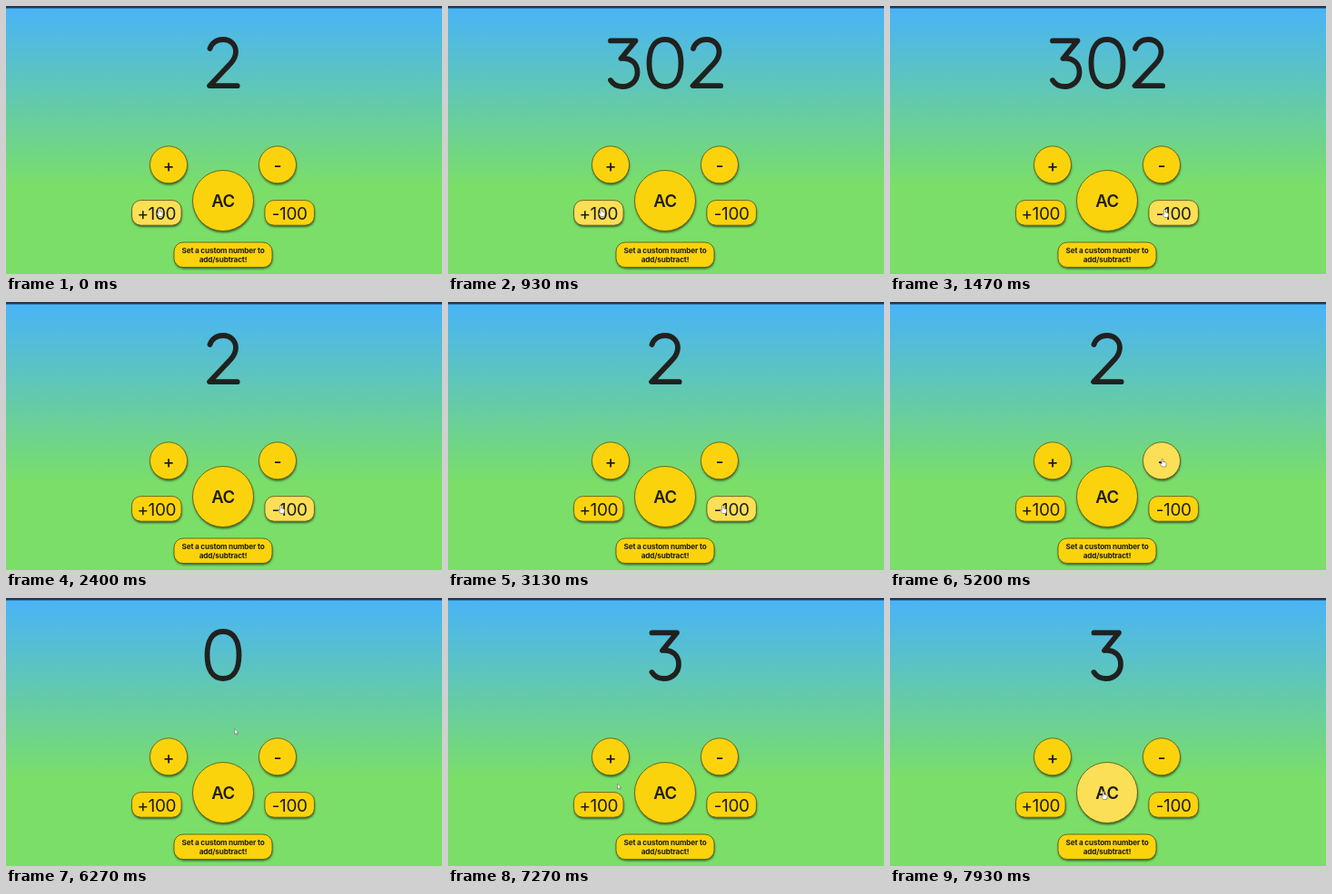
An HTML page that plays this animation: 480 px wide and 296 px high, repeating every 8 s.

```html
<!DOCTYPE html>
<html lang="en">
<head>
<meta charset="utf-8">
<title>Counter</title>
<style>
  html, body { margin: 0; width: 100%; height: 100%; overflow: hidden; background: #7ade69; }
  svg { display: block; width: 100vw; height: 100vh; }
  text { font-family: Inter, Lato, sans-serif; fill: #1d1d14; text-anchor: middle; }
  .key { stroke: #665f1c; stroke-width: .9; }
  .shade { fill: #1f3a19; opacity: .8; }
  #number { fill: none; stroke: #20211f; stroke-width: 5.8; stroke-linecap: round; stroke-linejoin: round; }
  #cursor path { fill: #fff; stroke: #66675d; stroke-width: .6; stroke-linejoin: round; }
</style>
</head>
<body>
<svg viewBox="0 0 480 296" preserveAspectRatio="none">
  <defs>
    <linearGradient id="sky" x1="0" y1="0" x2="0" y2="1">
      <stop offset="0" stop-color="#48b3f9"/>
      <stop offset=".67" stop-color="#7ade69"/>
    </linearGradient>
    <filter id="soft" x="-20%" y="-20%" width="140%" height="150%"><feGaussianBlur stdDeviation=".8"/></filter>
  </defs>
  <rect width="480" height="296" fill="url(#sky)"/>
  <rect width="480" height="2.5" fill="#27354e"/>
  <rect x="46" width="380" height="1.6" fill="#343149"/>
  <g id="number" role="img"></g>
  <g id="keys"></g>
  <g id="cursor">
    <path id="arrow" d="M0 0V6L1.5 4.8 2.5 6.9 3.4 6.4 2.5 4.4H4.3Z"/>
    <path id="hand" d="M-.9 .7Q0-.6.8.7V3.4L3.4 4.1Q4.5 4.5 4.2 6L3.6 9H-.4L-2.6 6Q-2.8 5-1.8 5.2L-.9 6Z"/>
  </g>
</svg>
<script>
const LOOP = 8000;
const MID = 239;
const $ = id => document.getElementById(id);

function add(parent, tag, attrs, content) {
  const el = document.createElementNS("http://www.w3.org/2000/svg", tag);
  for (const k in attrs) el.setAttribute(k, attrs[k]);
  if (content) el.textContent = content;
  parent.append(el);
  return el;
}

function makeKey(x, y, w, h, size, weight, ...lines) {
  const r = Math.min(h / 2, w > h ? 10 : w);
  const box = { x: x - w / 2, y: y - h / 2, width: w, height: h, rx: r };
  const group = $("keys");
  add(group, "rect", { ...box, x: box.x + .4, y: box.y + 1.7, class: "shade", filter: "url(#soft)" });
  const face = add(group, "rect", { ...box, class: "key" });
  lines.forEach((line, i) => add(group, "text", {
    x, y: y + size * .38 + (i - (lines.length - 1) / 2) * 10.2,
    "font-size": size, "font-weight": weight, "letter-spacing": "-.02em"
  }, line));
  return { x, y, w, h, r, face };
}

const keys = [
  makeKey(MID - 60, 175.3, 41, 41, 19, 500, "+"),
  makeKey(MID + 60, 175.3, 41, 41, 19, 500, "-"),
  makeKey(MID, 215, 67, 67, 18.5, 600, "AC"),
  makeKey(MID - 73.2, 228.4, 54.5, 27.6, 19, 400, "+100"),
  makeKey(MID + 73.2, 228.4, 54.5, 27.6, 19, 400, "-100"),
  makeKey(MID, 274.8, 108, 27.6, 8.2, 700, "Set a custom number to", "add/subtract!")
];

function inside(k, [x, y]) {
  const dx = Math.max(Math.abs(x - k.x) - k.w / 2 + k.r, 0);
  const dy = Math.max(Math.abs(y - k.y) - k.h / 2 + k.r, 0);
  return Math.hypot(dx, dy) <= k.r;
}

// Digit strokes around x = 0
const glyphs = {
  0: "M0 37C11.5 37 17.5 47 17.5 63S11.5 89 0 89S-17.5 79-17.5 63S-11.5 37 0 37Z",
  1: "M-7 44L4 37V88.5",
  2: "M-14.5 47C-12.5 41-7 37 0 37C8.5 37 14 43 14 50.5C14 56 11.5 60 8 63.7L-15 88.2H15.7",
  3: "M-14.5 38.4H13L-3 58C8 56.5 15 63.5 15 73C15 82.5 8 89-1.5 89C-7.5 89-12 86-14.5 82"
};
const advance = d => d === "1" ? 31 : 45.5;

// Runs of clicks: first click, gap, count, step
const runs = [[130, 300, 3, 100], [1600, 333, 3, -100], [5270, 200, 2, -1], [6800, 130, 3, 1]];

function valueAt(t) {
  return runs.reduce((sum, [first, gap, count, step]) => {
    const done = Math.floor((t - first) / gap) + 1;
    return sum + step * Math.min(count, Math.max(0, done));
  }, 2);
}

// Pointer moves: start, end, bend point, goal
const home = [168.6, 223.5];
const moves = [
  [930, 1400, [235, 221], [302.5, 224.5]],
  [3530, 4200, [314, 225], [321, 214.8]],
  [4200, 5200, [395, 88], [300, 173]],
  [5930, 6715, [240, 114], [180, 172]],
  [7070, 7270, [180, 190], [186.5, 205]],
  [7270, 7900, [205, 222], [235, 213.5]]
];

function pointer(t) {
  let from = home;
  for (const [start, end, bend, goal] of moves) {
    if (t < start) break;
    const u = Math.min(1, (t - start) / (end - start));
    const s = u * u * (3 - 2 * u);
    from = from.map((p, i) => p * (1 - s) ** 2 + 2 * s * (1 - s) * bend[i] + s * s * goal[i]);
  }
  return from;
}

let shown = null;
function showNumber(value) {
  if (value === shown) return;
  shown = value;
  const digits = [...String(value)];
  let x = MID - digits.reduce((sum, d) => sum + advance(d), 0) / 2;
  $("number").replaceChildren();
  $("number").setAttribute("aria-label", value);
  for (const d of digits) {
    add($("number"), "path", { d: glyphs[d], transform: `translate(${x + advance(d) / 2})` });
    x += advance(d);
  }
}

function draw(t) {
  showNumber(valueAt(t));
  const tip = pointer(t);
  let over = false;
  for (const k of keys) {
    const hit = inside(k, tip);
    over = over || hit;
    k.face.setAttribute("fill", hit ? "#fbdf56" : "#fbd30c");
  }
  $("hand").style.display = over ? "" : "none";
  $("arrow").style.display = over ? "none" : "";
  $("cursor").setAttribute("transform", `translate(${tip})`);
}

const begin = performance.now();
function tick(now) {
  draw(Math.max(0, now - begin) % LOOP);
  requestAnimationFrame(tick);
}
draw(0);
requestAnimationFrame(tick);
</script>
</body>
</html>
```
